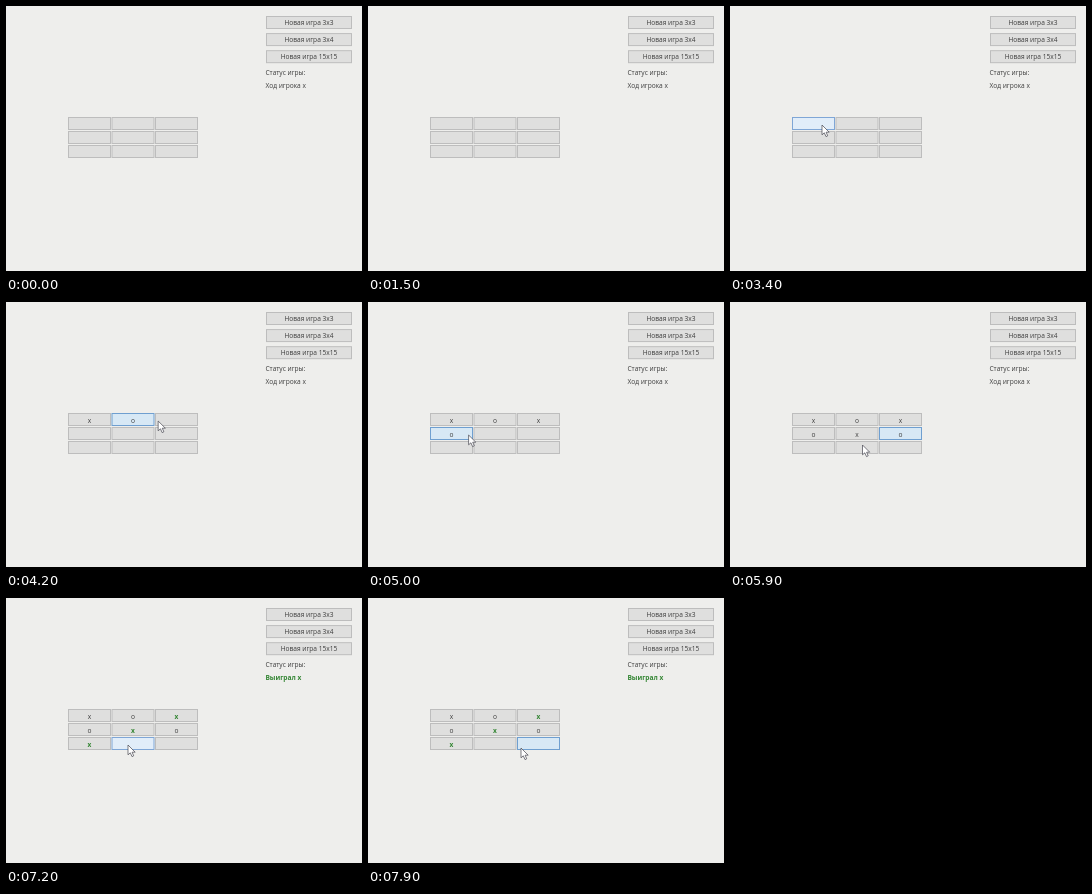
Recreate the animation shown at these times as an HTML page. Size 356 by 268 pixels, loop 8000 ms.

```html
<!DOCTYPE html>
<html lang="ru">
<head>
<meta charset="utf-8">
<title>Крестики-нолики</title>
<style>
  html, body { margin: 0; width: 100%; height: 100%; overflow: hidden; background: #eeeeec; }
  svg { display: block; width: 356px; height: 268px; }
  text { font: 6.6px "Open Sans", "Noto Sans", sans-serif; fill: #3c3c3c; }
  .mid { text-anchor: middle; }
  .box { fill: #dfdfde; stroke: #bdbdbd; }
  .hover { fill: #e1edf9; stroke: #7fa6d6; }
  .pressed { fill: #d7e8f5; stroke: #6f9fd0; }
  .win { font-weight: 700; fill: #348634; }
</style>
</head>
<body>
<svg id="stage" viewBox="0 0 356 268">
  <rect y="265" width="356" height="3"/>
</svg>
<script>
const LOOP = 8000, STEP = 100;
const stage = document.getElementById('stage');

function add(tag, attrs, text = '') {
  const el = document.createElementNS('http://www.w3.org/2000/svg', tag);
  for (const key in attrs) el.setAttribute(key, attrs[key]);
  el.textContent = text;
  return stage.appendChild(el);
}

function button(x, y, width, label, baseline) {
  const box = add('rect', { class: 'box', x, y, width, height: 12 });
  const text = add('text', { class: 'mid', x: x + width / 2, y: y + baseline }, label);
  return { box, text };
}

['3x3', '3x4', '15x15'].forEach((size, i) =>
  button(260.5, 10.5 + i * 17.1, 85, 'Новая игра ' + size, 8.4));
add('text', { x: 259.4, y: 68.8 }, 'Статус игры:');
const status = add('text', { x: 259.4, y: 81.6 });

const LEFT = 62.5, TOP = 111.5, COL = 43.5, ROW = 14;
const cells = Array.from({ length: 9 }, (_, i) =>
  button(LEFT + i % 3 * COL, TOP + Math.floor(i / 3) * ROW, 42, '', 9.2));

const cursor = add('path', {
  d: 'M0 0V9.8L2.3 7.8L4 11.6L5.7 10.8L4.1 7.2H7.2Z',
  fill: '#fff', stroke: '#454550', 'stroke-width': 0.7, 'stroke-linejoin': 'round'
});

// Cells 0..6 are pressed in turn at an even pace; the last press wins.
const FIRST = 3500, PACE = 466, MOVES = 7;
const winLine = [2, 4, 6];
const HOVER_LAG = 45;

// Pointer stops: [ms, x, y]; a negative y is off the stage.
const route = [
  [0, 181, -14], [400, 181, -14], [500, 181, 0], [800, 189, 48], [1200, 180, -30],
  [1400, 180, -1], [1500, 180, -14], [2600, 180, -14], [2700, 178, 7],
  [3400, 92, 119], [3500, 92, 119], [3960, 131, 119], [4430, 172, 119],
  [4900, 96, 133], [5360, 134, 133], [5800, 172, 131], [5900, 132.5, 143],
  [6300, 86, 148], [7100, 85.5, 148], [7200, 122, 147],
  [7400, 250, 50], [7500, 286, 73], [7900, 153, 150], [LOOP, 153, 150]
];

function pointAt(t) {
  const i = Math.max(1, route.findIndex(stop => stop[0] > t));
  const [t0, x0, y0] = route[i - 1], [t1, x1, y1] = route[i];
  const k = (t - t0) / (t1 - t0), ease = k * k * (3 - 2 * k);
  return [x0 + (x1 - x0) * ease, y0 + (y1 - y0) * ease];
}

function cellAt([x, y]) {
  const col = Math.floor((x - LEFT + 0.5) / COL);
  const row = Math.floor((y - TOP + 0.5) / ROW);
  const inside = col >= 0 && col < 3 && row >= 0 && row < 3;
  return inside ? row * 3 + col : -1;
}

function draw(t) {
  const moves = Math.min(MOVES, Math.max(0, Math.floor((t - FIRST) / PACE) + 1));
  const won = moves === MOVES;
  const hot = cellAt(pointAt(Math.max(0, t - HOVER_LAG)));

  cells.forEach(({ box, text }, i) => {
    const taken = i < moves;
    const lit = i === hot && !(won && taken);
    text.textContent = taken ? 'xo'[i % 2] : '';
    text.classList.toggle('win', won && winLine.includes(i));
    box.classList.toggle('hover', lit);
    box.classList.toggle('pressed', lit && (taken || i === 8));
  });
  status.textContent = won ? 'Выиграл x' : 'Ход игрока ' + 'xo'[moves % 2];
  status.classList.toggle('win', won);
  cursor.setAttribute('transform', `translate(${pointAt(t)})`);
}

const start = performance.now();
function tick() {
  const t = (performance.now() - start) % LOOP;
  draw(Math.floor(t / STEP) * STEP);
  requestAnimationFrame(tick);
}
tick();
</script>
</body>
</html>
```
